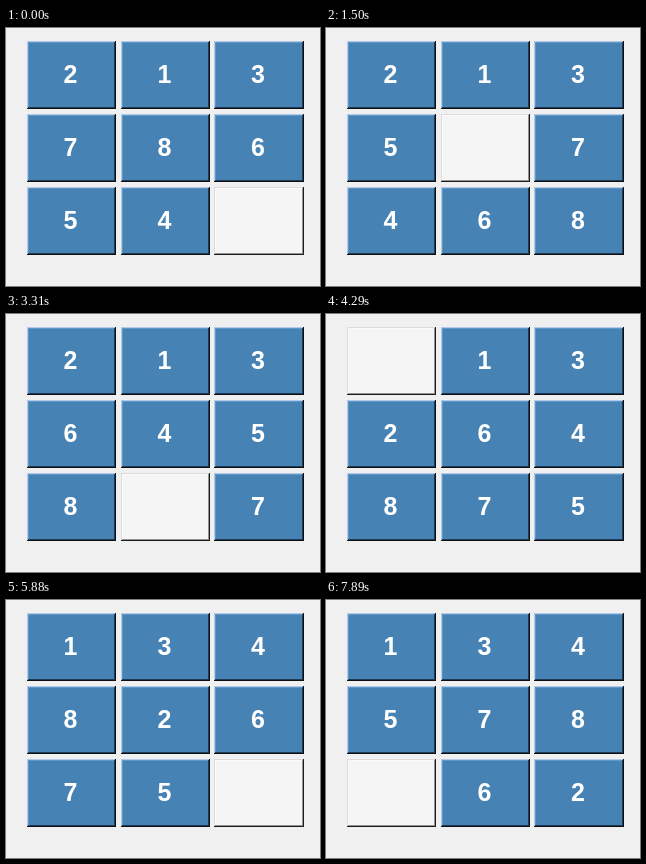
These frames come from a looping animation (314x258 px, 8 s). An HTML page:

```html
<!DOCTYPE html>
<html lang="en">
<head>
<meta charset="utf-8">
<title>Sliding puzzle</title>
<style>
  html, body {
    margin: 0;
    width: 100%;
    height: 100%;
    overflow: hidden;
    background: #f0f0f0;
  }
  .tile {
    position: absolute;
    box-sizing: border-box;
    height: 68px;
    padding: 0 2px 1px 0;
    font: bold 25px/67px "Liberation Sans", Arial, sans-serif;
    text-align: center;
    color: #fff;
    background: #4682b4;
    box-shadow:
      inset -1px -1px #0c1015,
      inset 1px 1px #b4c8e8,
      inset -2px -2px #203b55,
      inset 2px 2px #5c98ca;
  }
  .tile:empty {
    background: #f5f5f5;
    box-shadow:
      inset -1px -1px #1c1c1c,
      inset 1px 1px #dcdcdc,
      inset -2px -2px #939393,
      inset 2px 2px #fbfbfb;
  }
</style>
</head>
<body>
<script>
const LOOP = 8000;
const COLUMNS = [[21, 89], [115, 89], [208, 90]];
const ROWS = [13, 86, 159];
const START = [2, 1, 3, 7, 8, 6, 5, 4, 0];

// Directions in which the gap travels: laps of the lower rows, one detour over the top.
const LAP = "ULLDRR";
const MOVES = LAP.repeat(3) + "ULL" + "URRD" + "LLDRR" + LAP + "ULLD";
const OFFSET = { U: -3, D: 3, L: -1, R: 1 };

const FIRST_MOVE = 70;
const GAP = 200;
const UNEVEN_GAPS = { 1: 210, 2: 210, 3: 210, 11: 190, 22: 210, 23: 180, 39: 210 };

function buildTimeline() {
  const timeline = [{ time: 0, board: START }];
  let board = START;
  let time = FIRST_MOVE;
  [...MOVES].forEach((move, i) => {
    if (i) time += UNEVEN_GAPS[i] || GAP;
    board = [...board];
    const gap = board.indexOf(0);
    const next = gap + OFFSET[move];
    board[gap] = board[next];
    board[next] = 0;
    timeline.push({ time, board });
  });
  return timeline;
}

const tiles = START.map((_, i) => {
  const tile = document.createElement("div");
  const [left, width] = COLUMNS[i % 3];
  tile.className = "tile";
  tile.style.left = left + "px";
  tile.style.width = width + "px";
  tile.style.top = ROWS[Math.floor(i / 3)] + "px";
  document.body.append(tile);
  return tile;
});

const timeline = buildTimeline();
let shown;

function show(board) {
  if (board === shown) return;
  shown = board;
  tiles.forEach((tile, i) => { tile.textContent = board[i] || ""; });
}

let begin;
function tick(now) {
  begin ??= now;
  const time = (now - begin) % LOOP;
  show(timeline.findLast(step => step.time <= time).board);
  requestAnimationFrame(tick);
}

show(START);
requestAnimationFrame(tick);
</script>
</body>
</html>
```
